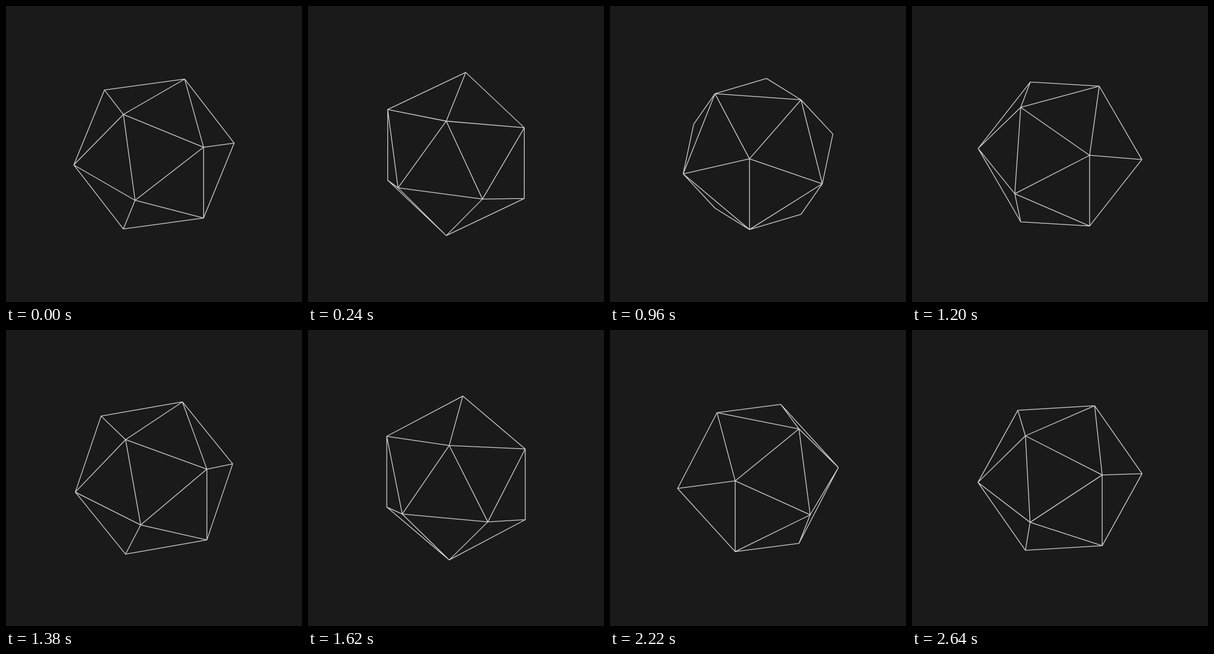
These frames come from a looping animation (500x500 px, 2.7 s). An HTML page:

```html
<!DOCTYPE html>
<html lang="en">
<head>
<meta charset="utf-8">
<title>Rotating icosahedron</title>
<style>
  html, body { margin: 0; width: 100%; height: 100%; overflow: hidden; background: #1a1a1a; }
  svg { display: block; width: 500px; height: 500px; }
  path { fill: none; stroke: #d0d0d0; stroke-width: 1.3; stroke-linecap: round; }
</style>
</head>
<body>
<svg viewBox="0 0 500 500"><path id="wire"/></svg>
<script>
const STEP = 60, STEPS = 45, RADIUS = 139.2, CENTER = 250;
const PHI = (1 + Math.sqrt(5)) / 2;
const SCALE = RADIUS / Math.hypot(1, PHI);
// isometric camera looking down on the solid
const SIN = Math.sqrt(1 / 3), COS = Math.sqrt(2 / 3);
const wire = document.getElementById("wire");

const verts = [];
for (const a of [-1, 1])
  for (const b of [-PHI, PHI])
    verts.push([b, 0, a], [0, a, b], [a, b, 0]);

const adjacent = (p, q) =>
  Math.abs(Math.hypot(p[0] - q[0], p[1] - q[1], p[2] - q[2]) - 2) < 0.01;

const faces = [];
verts.forEach((p, i) => verts.forEach((q, j) => verts.forEach((r, k) => {
  if (i < j && j < k && adjacent(p, q) && adjacent(q, r) && adjacent(p, r))
    faces.push([i, j, k]);
})));

function project([x, y, z], turn) {
  const c = Math.cos(turn), s = Math.sin(turn);
  const side = z * c - x * s, near = z * s + x * c;
  return {
    x: CENTER + SCALE * side,
    y: CENTER + SCALE * (y * COS + near * SIN),
    depth: near * COS - y * SIN
  };
}

function draw(time) {
  const step = Math.floor(time / STEP) % STEPS;
  const turn = Math.PI / 4 - step / STEPS * 2 * Math.PI;
  const pts = verts.map(v => project(v, turn));
  const edges = new Set();
  for (const [a, b, c] of faces) {
    if (pts[a].depth + pts[b].depth + pts[c].depth <= 0) continue;
    for (const [i, j] of [[a, b], [b, c], [a, c]]) {
      const p = pts[i], q = pts[j];
      edges.add(`M${p.x.toFixed(2)} ${p.y.toFixed(2)}L${q.x.toFixed(2)} ${q.y.toFixed(2)}`);
    }
  }
  wire.setAttribute("d", [...edges].join(""));
}

function tick() {
  draw(performance.now() - start);
  requestAnimationFrame(tick);
}
const start = performance.now();
tick();
</script>
</body>
</html>
```
